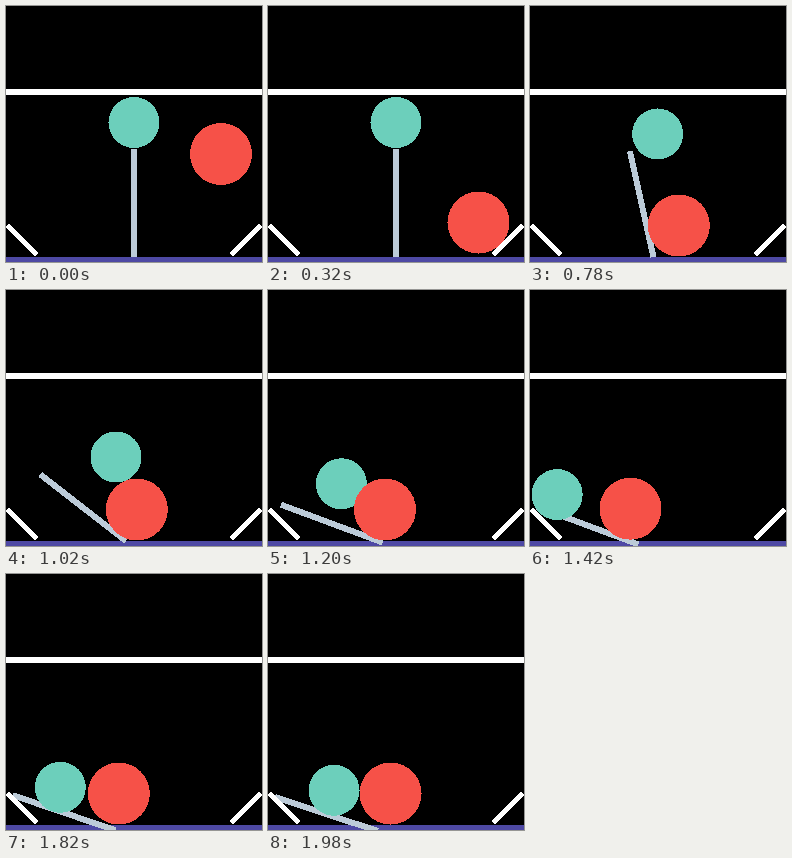
An HTML page that plays this animation: 256 px wide and 256 px high, repeating every 2 s.

```html
<!DOCTYPE html>
<html lang="en">
<head>
<meta charset="utf-8">
<title>Ball, stick and ramp</title>
<style>
  html, body { margin: 0; width: 100%; height: 100%; overflow: hidden; background: #000; }
  svg { display: block; width: 100vw; height: 100vh; shape-rendering: crispEdges; }
</style>
</head>
<body>
<svg viewBox="0 0 256 256">
  <rect width="256" height="256" fill="#000"/>
  <rect y="83" width="256" height="6" fill="#fff"/>
  <rect y="251" width="256" height="5" fill="#4e49a4"/>
  <rect id="stick" x="-3" y="-108.5" width="6" height="108.5" fill="#bccbd8"/>
  <path d="M1.5 219.5L31 249M254.5 219.5L225 249" stroke="#fff" stroke-width="5"/>
  <circle id="green" r="25.5" fill="#6ccfbb"/>
  <circle id="red" r="31" fill="#f65148"/>
</svg>
<script>
const LOOP = 2000, STEP = 20;
const GRAVITY = 1400; // px per s²

// Moments of contact in ms
const RAMP = 300, FLOOR = 331, HIT = 605, DROP = 652, MEET = 913, SLIP = 1080,
      REST = 1094, LAND = 1255, CLIMB = 1370, WALL = 1428, DOWN = 1660;

// Each leg is [start time, speed, acceleration]; the last one runs on.
function motion(from, ...legs) {
  return t => legs.reduce((pos, [begin, speed, accel = 0], i) => {
    const end = i + 1 < legs.length ? legs[i + 1][0] : LOOP;
    const s = Math.max(0, Math.min(t, end) - begin) / 1000;
    return pos + speed * s + accel * s * s / 2;
  }, from);
}

const red = {
  x: motion(215, [RAMP, -225], [FLOOR, -168], [HIT, -75], [SLIP, -78], [CLIMB, -78, 522], [DOWN, 61]),
  y: motion(148, [0, 0, GRAVITY], [RAMP, 275], [FLOOR, 0], [CLIMB, -20, 138], [DOWN, 0])
};

const green = {
  x: motion(128, [DROP, -2.7], [MEET, -142, -360], [SLIP, -210], [WALL, 73.5]),
  y: motion(116.5, [DROP, 0, GRAVITY], [MEET, 5.6, 385], [SLIP, 110, GRAVITY], [LAND, -40], [WALL, 26, -15])
};

const stick = {
  x: motion(128, [HIT, -26], [780, -14.6], [1020, -29], [WALL, 3]),
  y: motion(251, [1020, 8.5], [WALL, 4.6]),
  angle: motion(0, [HIT, 32.3, 450], [REST, 0], [WALL, 3.9])
};

const start = performance.now();

function place(id, { x, y, angle = () => 0 }, t) {
  document.getElementById(id)
    .setAttribute("transform", `translate(${x(t)} ${y(t)}) rotate(${-angle(t)})`);
}

function draw() {
  const elapsed = (performance.now() - start) % LOOP;
  const t = Math.floor(elapsed / STEP) * STEP;
  place("stick", stick, t);
  place("green", green, t);
  place("red", red, t);
  requestAnimationFrame(draw);
}
draw();
</script>
</body>
</html>
```
